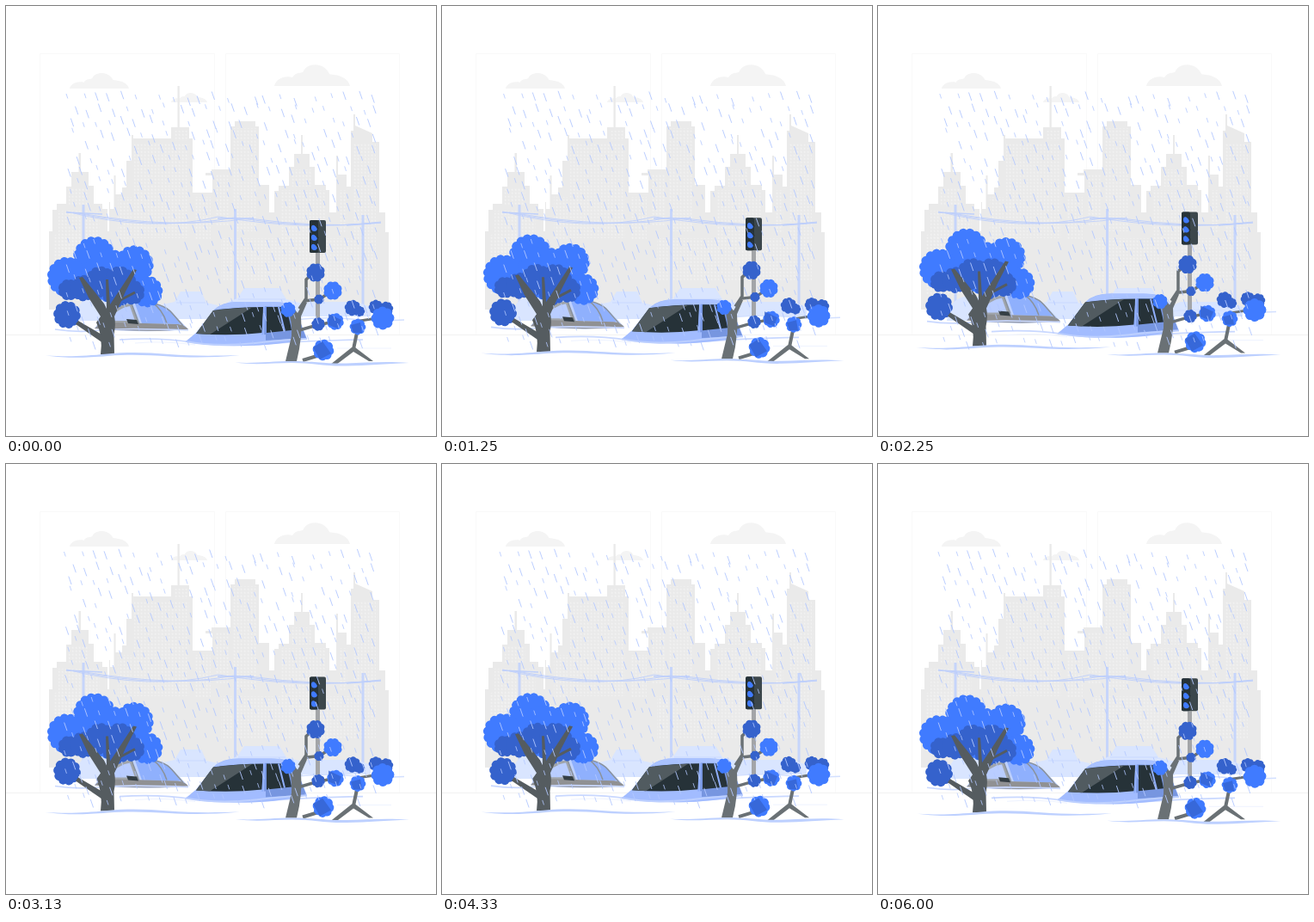
Animation, 500 px wide and 500 px high, one loop 6.04 s. Source, as an HTML page:

```html
<!DOCTYPE html>
<html lang="en">
<head>
<meta charset="utf-8">
<title>Flooded city</title>
<style>
  html, body { margin: 0; width: 100%; height: 100%; overflow: hidden; background: #fff; }
  svg { display: block; width: 100vw; height: 100vh; }
</style>
</head>
<body>
<svg id="stage" viewBox="0 0 500 500"></svg>
<script>
const LOOP = 6040;
const FLOAT = LOOP / 4;
const BLUE = '#407bff', NAVY = '#3562cc', BARK = '#555c60', TWIG = '#6a7175', LINE = '#bdd0ff';

let seed = 11;
const random = () => (seed = (seed * 16807) % 2147483647) / 2147483647;

const fill = (d, color, extra = '') => `<path d="${d}" fill="${color}" ${extra}/>`;
const stroke = (d, color, width, extra = '') =>
  `<path d="${d}" fill="none" stroke="${color}" stroke-width="${width}" stroke-linejoin="round" ${extra}/>`;

// Round foliage with a shallow scalloped rim
function bush(x, y, r, color, turn = 0) {
  const count = Math.max(8, Math.round(r * 0.65));
  const inner = r * 0.93, bump = inner * Math.PI / count * 1.2;
  let d = '';
  for (let i = 0; i <= count; i++) {
    const a = turn + i / count * 2 * Math.PI;
    const p = `${(x + inner * Math.cos(a)).toFixed(1)} ${(y + inner * Math.sin(a)).toFixed(1)}`;
    d += i ? `A${bump.toFixed(1)} ${bump.toFixed(1)} 0 0 1 ${p}` : `M${p}`;
  }
  return fill(d + 'Z', color);
}
const bushes = (color, list) => list.map(([x, y, r], i) => bush(x, y, r, color, i * 0.7)).join('');

function cloud(x, y, w, h, color) {
  const at = (u, v) => `${x + u * w} ${y - v * h}`;
  return fill(`M${at(0, 0)}C${at(.02, .3)} ${at(.12, .5)} ${at(.24, .4)}C${at(.28, .65)} ${at(.36, .6)} ${at(.38, .65)}
    C${at(.42, 1.1)} ${at(.66, 1.15)} ${at(.73, .55)}C${at(.9, .5)} ${at(.98, .3)} ${at(1, 0)}Z`, color);
}

const skyline = `M50 353V262H54V237H59V230H70V210H76V193H84.5V171H87V193H96V209H102V230H112V236H118V262H120V228H121V236H125.500
  V197H127.500V219H135V211H140V180H146V150H148V154H192V141H199.500V93H201.800V141H213V154H217V217H240V197H232V194H239V190H261V140H266V134H290V140H294V208
  H306V240H312V215H317V209H329V187H335V172H343V150H345V172H353V187H359V208H372V214H376V240H384V174H386V196H396V210H401V145H404
  V126H406V139L426 148V158H434V240H441V263H445V353Z`;

const windowBlocks = [[61, 238, 48, 60], [73, 212, 24, 20], [149, 160, 64, 110], [196, 145, 16, 12], [243, 196, 16, 60],
  [264, 142, 28, 120], [319, 214, 52, 60], [332, 190, 24, 20], [404, 160, 26, 110], [130, 222, 16, 50], [220, 222, 18, 50],
  [387, 214, 10, 50], [56, 266, 50, 70], [250, 270, 180, 50]];

function city() {
  const windows = windowBlocks.map(([x, y, w, h]) =>
    `<rect x="${x}" y="${y}" width="${w}" height="${h}" fill="url(#panes)"/>`).join('');
  return `<defs><pattern id="panes" width="4" height="4" patternUnits="userSpaceOnUse">
      <rect x=".8" y=".8" width="1.6" height="2" fill="#f1f1f1"/></pattern></defs>` +
    stroke('M39.500 382V55.500H242.500V382M255.500 382V55.500H457.500V382', '#f9f9f9', 1) +
    stroke('M0 382.500H500', '#f2f2f2', 1) +
    cloud(74, 96, 69, 18, '#f4f4f4') + cloud(192, 112, 42, 11, '#f4f4f4') + cloud(312, 93, 88, 25, '#f4f4f4') +
    fill(skyline, '#eaeaea') + windows;
}

function powerLines() {
  const poles = [[90, 231], [266.500, 236], [415, 243]].map(([x, y]) => stroke(`M${x} ${y}V352`, '#c6d5fb', 3)).join('');
  const wires = [0, 2, 4].map(k =>
    stroke(`M${70 + k * 4} ${239 + k / 2}Q${170 + k * 6} ${264 - k} ${247 + k * 9} ${245 + k / 2}Q${350 + k * 3} ${262 - k} ${436 - k * 3} ${251 + k / 2}`,
      '#bfd0fb', .9)).join('');
  return poles + stroke('M70 240L112 242M246 247H288M396 255L436 252', '#bfd0fb', 1.600) + wires;
}

function farCars() {
  const pale = '#d9e5ff';
  return fill('M80 366Q82 342 100 338H117V366Z', pale) +
    fill('M178 364V348L196 344L203 332H227L233 345L246 348V364Z', pale) +
    fill('M258 362V344L269 340L277 328H318L326 341L345 346V362Z', pale) +
    fill('M340 361V349L352 344H408L424 350V361Z', pale) +
    stroke('M198 345H232M270 341H325', '#c9d9ff', 1);
}

function leftCar() {
  return fill('M103 375Q120 346 150 344Q181 343 194 357L212 376Q160 381 103 375Z', '#bed1ff') +
    fill('M150 346Q181 343 193 357L203 370L158 369Z', '#8fb0fd') +
    fill('M105 374Q122 347 146 346L155 370L112 372Z', '#a0a5ab') +
    fill('M118 366Q130 351 144 349L150 366Z', '#b9cdff') +
    fill('M103 375Q111 366 124 368L200 370Q208 371 212 376Q165 380 103 375Z', '#909193') +
    stroke('M146 346L155 370M150 345Q181 343 193 357L206 372M170 345Q182 353 187 369', '#8a929b', 1.500) +
    fill('M140 364L152 365L154 370L142 369Z', '#353f45');
}

function frontCar() {
  return fill('M209 390L221 380L242 353Q251 344 270 344H310Q330 344 336 352L350 387Q300 398 250 394Z', '#a2bcff') +
    fill('M301 347H326L338 357L349 386L300 389Z', '#7796e0') +
    fill('M244 352Q254 344 270 344H309Q327 344 332 350Q290 348 244 352Z', '#a9c2ff') +
    fill('M221 381L241 354Q270 350 299 350L298 380Q262 384 221 381Z', '#263238') +
    fill('M221 381L241 354Q265 351 286 350.500L237 382Z', '#515b60') +
    fill('M303 350L325 350Q330 365 332 377L303 380Z', '#263238') +
    stroke('M300.500 350L298 385M317 350L324 378', '#8faefa', 2) +
    fill('M209 390L222 382Q266 386 302 382L302 390Q255 399 209 390Z', '#a2bcff') +
    stroke('M209 390Q245 397 290 392T350 387', LINE, 2);
}

function leftTree() {
  return bushes(BLUE, [[103, 293, 25], [149, 301, 22.500], [71, 315, 23], [118, 313, 31], [164, 332, 18]]) +
    bushes(NAVY, [[73, 330, 12], [90, 328, 15], [110, 321, 18], [132, 322, 19], [147, 333, 14], [129, 333, 17], [71, 359, 15.500]]) +
    fill(`M110 405Q113 384 105 368L110 361L96 339L85 316L89 315L102 331L114 346L117 352L116 318H119L121 347L133 329L148 306
      L152 307L139 332L126 361Q128 370 125.500 382L126 405Z`, BARK) +
    fill('M113 392L81 370L84 366L113 383Z', BARK) +
    stroke('M100 342L96 326M129 344L150 333', BARK, 3);
}

function trafficLight() {
  return '<rect x="360" y="287" width="5" height="76" fill="#a3a5a8"/>' +
    '<rect x="353" y="249" width="19" height="38" rx="2" fill="#3c474c"/><rect x="353" y="249" width="10" height="38" rx="2" fill="#263238"/>' +
    [258, 269, 280].map(y => `<ellipse cx="358.500" cy="${y}" rx="3.500" ry="4" fill="${BLUE}"/>` +
      stroke(`M354 ${y - 3}Q359 ${y - 7} 363 ${y + 1}`, '#263238', 2)).join('');
}

function rightTrees() {
  return stroke('M341 352L349 340V318L358 310M346 343L364 341L377 333M341 377L362 371L382 367', TWIG, 3.500) +
    fill('M325 413L332 384Q333 366 328 354L334 351L339 357L347 343L350 345L343 361Q345 385 338 413Z', TWIG) +
    stroke('M345 412L368 405M404 399L409 375', TWIG, 4) +
    fill('M377 417L402 397H406L427 413H422L404 402L384 417Z', TWIG) +
    stroke('M412 366L431 363', TWIG, 3) +
    bushes(NAVY, [[360, 310, 10.500], [364, 341, 5.500], [363, 370, 7.500], [403, 351, 9], [411, 355, 6], [430, 350, 8], [442, 352, 8]]) +
    bushes(BLUE, [[380, 331, 10.500], [328, 353, 8.500], [383, 367, 9.500], [369, 400, 12], [409, 373, 9], [438, 363, 13]]) +
    fill('M375 358L390 365L386 375L375 371ZM357 397L368 390L378 404L365 411ZM401 371L412 368L414 380L404 380Z', NAVY, 'opacity=".75"');
}

const leftWave = fill(`M46 406.500C75 408 92 407 118 404.500S165 403 190 405S240 407 272 406
  C240 409 215 409 190 407.500S145 405 118 407S75 410 46 406.500Z`, LINE);
const rightWave = fill(`M266 414.500C290 416 308 413 332 413S372 416 395 415.500S440 413 468 415
  C440 416 420 418 395 418.500S355 415 332 415S290 418 266 414.500Z`, LINE);
const midWaves = stroke('M57 376Q84 380 110 377T212 377M132 388Q178 385 216 391T302 393T415 388', '#c9d8ff', 1.700) +
  stroke('M335 365Q372 361 401 364T463 365', '#d3e0ff', 1.500) + stroke('M150 392Q185 389 220 394M385 398H448', '#eef3ff', 1);

function rain() {
  let short = '', long = '';
  for (let row = 0; row < 21; row++) {
    for (let col = 0; col < 24; col++) {
      const x = 70 + col * 15.200 + (row % 2) * 6 + random() * 7;
      const y = 98 + row * 14.200 + random() * 9;
      if (x > 430 || y > 400 || random() < .1) continue;
      const start = `M${x.toFixed(1)} ${y.toFixed(1)}`;
      if (random() < .5) short += start + 'l1.800 5.500';
      else long += start + 'l3.300 9.500';
    }
  }
  return stroke(short, '#b3c8ff', .8) + stroke(long, '#b3c8ff', .9);
}

document.getElementById('stage').innerHTML = city() + powerLines() + farCars() +
  `<g id="flood">${leftCar()}${midWaves}${frontCar()}${leftTree()}${trafficLight()}${rightTrees()}
    <g id="leftWave">${leftWave}</g><g id="rightWave">${rightWave}</g></g><g id="rain">${rain()}</g>`;

const parts = Object.fromEntries(['flood', 'leftWave', 'rightWave', 'rain'].map(id => [id, document.getElementById(id)]));
const move = (part, x, y) => part.setAttribute('transform', `translate(${x.toFixed(2)} ${y.toFixed(2)})`);

// Sideways sway of the rain at each tenth of the loop
const sway = [0, -1, 2, -4, 4, -4, 4, -4, 2, -1, 0];

function draw(time) {
  const phase = (time / FLOAT + .02) % 1;
  const rise = 1 - Math.abs(1 - 2 * phase);
  move(parts.flood, 0, .4 - 10 * rise);
  move(parts.leftWave, -1.500 * rise, 0);
  move(parts.rightWave, .3 + 1.200 * Math.sin(2 * Math.PI * phase), 0);

  const step = time % LOOP / LOOP * 10, i = Math.floor(step);
  move(parts.rain, sway[i] + (sway[i + 1] - sway[i]) * (step - i), 0);
}

const started = performance.now();
function tick() {
  draw(performance.now() - started);
  requestAnimationFrame(tick);
}
tick();
</script>
</body>
</html>
```
